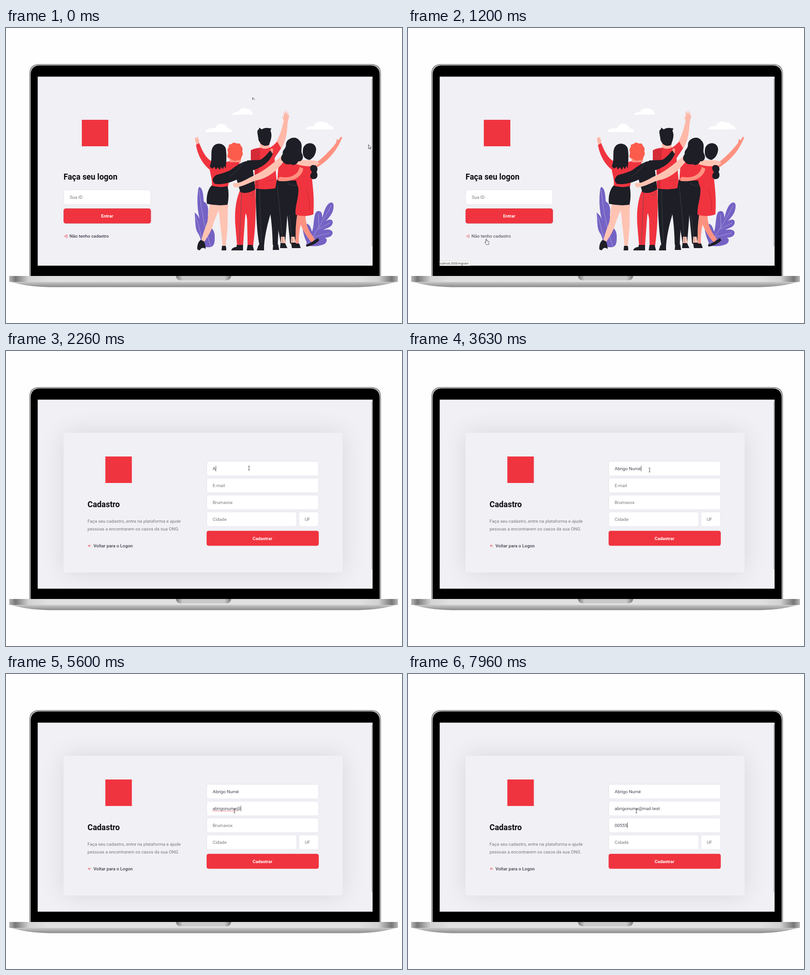
Animation, 867 px wide and 646 px high, one loop 8 s. Source, as an HTML page:

```html
<!DOCTYPE html>
<html lang="pt">
<head>
<meta charset="utf-8">
<title>Cadastro</title>
<style>
  html, body { margin: 0; width: 100%; height: 100%; overflow: hidden; background: #fefefe; }
  svg { display: block; width: 100vw; height: 100vh; }
  text { font: 400 9.8px Roboto, sans-serif; white-space: pre; fill: #454550; }
  .title { font-weight: 700; font-size: 17.43px; fill: #0c0c10; }
  .link { font-weight: 500; fill: #41414d; }
  .hint { fill: #787880; }
  .label { font-weight: 700; fill: #fff; text-anchor: middle; }
  .status { font: 6.3px "Open Sans", sans-serif; fill: #222; text-anchor: end; }
  .field { fill: #fff; stroke: #dcdce6; stroke-width: .7; }
  .red { fill: #f0343f; }
  .deep { fill: #d42b37; }
  .black { fill: #1d1e26; }
  .pale { fill: #ffc3b2; }
  .pink { fill: #ffb8a8; }
  .coral { fill: #ff9180; }
  .purple { fill: #7562c4; }
  .white { fill: #fff; }
  .line { fill: none; stroke-linecap: round; stroke-linejoin: round; }
  .icon { stroke: #f0343f; stroke-width: 2.4; }
  .vein { stroke: #b8afe4; stroke-width: .8; }
  .seam { stroke: #4b4c55; stroke-width: .7; }
  .fold { stroke: #a92330; stroke-width: .7; }
  .cursor { fill: #fff; stroke: #222; stroke-width: .8; stroke-linejoin: round; }
</style>
</head>
<body>
<svg viewBox="0 0 867 646" preserveAspectRatio="none">
  <defs>
    <clipPath id="screen"><rect x="69.400" y="106.600" width="733.200" height="414"/></clipPath>
    <filter id="blur" x="-30%" y="-50%" width="160%" height="200%"><feGaussianBlur stdDeviation="27"/></filter>
    <linearGradient id="deck" x2="1">
      <stop stop-color="#b8b8b8"/><stop offset=".016" stop-color="#777"/><stop offset=".05" stop-color="#d2d2d2"/>
      <stop offset=".1" stop-color="#e0e0e0"/><stop offset=".9" stop-color="#e0e0e0"/><stop offset=".95" stop-color="#d2d2d2"/>
      <stop offset=".984" stop-color="#777"/><stop offset="1" stop-color="#b8b8b8"/>
    </linearGradient>
    <linearGradient id="under" x2="0" y2="1"><stop stop-color="#cfcfcf"/><stop offset="1" stop-color="#8a8a8a"/></linearGradient>
    <linearGradient id="notch" x2="1">
      <stop stop-color="#777"/><stop offset=".12" stop-color="#c9c9c9"/>
      <stop offset=".88" stop-color="#c9c9c9"/><stop offset="1" stop-color="#777"/>
    </linearGradient>
  </defs>

  <!-- laptop -->
  <rect width="867" height="646" fill="#fefefe"/>
  <path fill="#7c7c7c" d="M51 543V101Q51 79 73 79H799Q821 79 821 101V543Z"/>
  <path fill="#bdbdbd" d="M52.200 543V102Q52.200 80.200 74 80.200H798Q819.800 80.200 819.800 102V543Z"/>
  <path d="M54 543V103Q54 82 75 82H797Q818 82 818 103V543Z"/>
  <path fill="url(#under)" d="M7 555H858C835 562 805 567 770 567.500H95C60 567 30 562 7 555Z"/>
  <rect x="7" y="543" width="851" height="13" fill="url(#deck)"/>
  <path fill="url(#notch)" d="M372 543H493Q492 552.500 482 552.500H383Q373 552.500 372 543Z"/>

  <g clip-path="url(#screen)">
    <rect x="69" y="106" width="734" height="415" fill="#f0f0f5"/>

    <g id="login">
      <rect class="red" x="166" y="201" width="58" height="58"/>
      <text class="title" x="126" y="332">Faça seu logon</text>
      <rect class="field" x="126.400" y="354.400" width="190.600" height="32.200" rx="4.400"/>
      <text class="hint" x="139.500" y="373.700">Sua ID</text>
      <g id="enter">
        <rect class="red" x="126.300" y="395.600" width="190.700" height="32.200" rx="4.400" stroke="#d02e3a" stroke-width=".7"/>
        <text class="label" x="221.600" y="415.200">Entrar</text>
      </g>
      <g id="signup">
        <path class="line icon" transform="translate(126.300 451.600) scale(.363)" d="M15 3h4a2 2 0 0 1 2 2v14a2 2 0 0 1-2 2h-4M10 17l5-5-5-5M15 12H3"/>
        <text class="link" x="139" y="459.200">Não tenho cadastro</text>
      </g>

      <!-- clouds -->
      <g class="white">
        <path d="M494 190C498 185 503 183 508 184C511 176 522 174 529 177C535 178 538 182 538 185Q541 186 541 190Z"/>
        <path d="M436 228C437 223 443 219 449 220C453 219 456 219 458 219C462 208 476 207 481 214C484 216 485 218 486 220C492 220 496 223 496 228Z"/>
        <path d="M656 222C659 216 666 214 674 215C677 205 688 201 697 207C701 205 707 209 708 213C714 213 717 217 717 222Z"/>
      </g>

      <!-- plants -->
      <g class="purple">
        <path d="M423 348C431 350 432 366 433 380C442 384 444 396 442 410C446 424 446 432 443 436C452 436 458 446 457 460C457 472 455 478 447 480H432C430 466 430 440 426 425C418 400 418 372 421 352Z"/>
        <path d="M413 404C424 412 428 426 429 440C434 452 434 464 432 480L428 478C428 464 424 456 421 450C413 440 415 420 413 404Z"/>
        <path d="M656 476C662 470 655 466 652 452C649 440 648 431 655 429C664 427 667 436 670 446C676 432 672 402 683 401C692 400 692 408 693 416C696 400 703 382 713 382C720 384 717 398 714 405C710 412 705 418 700 423C710 416 717 420 715 428C713 436 703 438 694 442C707 440 716 442 715 450C713 458 704 459 698 459C706 463 702 473 692 475C680 479 668 478 656 476Z"/>
      </g>
      <path class="line vein" d="M423 356Q430 425 448 478M416 414Q425 440 431 476M660 474Q686 438 712 389M672 457L657 437M685 437L684 408M682 441L709 427M671 458L708 449"/>

      <!-- woman with a raised left arm -->
      <path class="pale" d="M446 385L470 388C464 404 456 420 452 436C446 450 440 460 434 468L428 464C431 450 437 436 441 424ZM464 387H487C484 402 486 420 485 436C484 452 482 466 481 478H474C473 456 469 436 468 418Z"/>
      <path class="black" d="M426 464C421 468 418 476 419 485L424 487C428 481 432 480 437 484C437 476 435 470 433 467ZM473 477H481Q483 482 482 487H472Z"/>
      <path class="pink" d="M417 257L414 246C414 242 414 239 415 239L417 242V237L419 241L421 238V244C424 245 423 248 422 255Z"/>
      <path class="red" d="M416 256L423 252C430 270 438 286 452 293L476 295L512 286L510 303L492 316L486 348H450C453 336 448 323 446 310C430 298 419 276 416 256Z"/>
      <path class="black" d="M450 345C441 354 438 372 440 385Q464 390 485 387C488 372 488 358 485 346Q468 351 450 345Z"/>
      <path class="black" d="M450 270C452 250 474 248 481 263C484 280 482 296 481 308L478 302L475 309L471 304L468 311L464 305L459 310L457 304L451 308L446 303C451 293 449 282 450 270Z"/>

      <!-- friend with curly hair -->
      <path class="red" d="M512 356C504 375 500 400 502 430L506 477H519L523 420Q524 406 525 406Q527 410 528 420L529 477H541C546 440 548 400 546 350Z"/>
      <path class="black" d="M505 475H519V487H493Q494 481 505 479ZM529 475H540L543 487H527Z"/>
      <path class="coral" d="M488 276H514V294H490Z"/>
      <path fill="#fb5c4c" d="M487 285C482 280 487 276 486 271C483 265 487 263 488 260C486 254 493 255 495 253C500 248 504 254 507 253C514 251 513 258 516 260C520 265 516 269 518 273C520 279 514 282 515 287C510 291 506 288 502 291C496 291 494 286 487 285Z"/>
      <path class="black" d="M490 312C505 302 515 291 538 290L546 353C533 362 520 363 513 359L505 332C488 340 470 344 457 341C450 334 452 328 460 322C472 319 480 316 490 312Z"/>
      <path class="line seam" d="M516 361L511 471M531 362Q541 374 541 360"/>

      <!-- man with a raised right arm -->
      <path class="black" d="M547 349H592C589 390 570 420 565 477H555C549 445 548 410 547 380ZM569 350H597C601 390 597 425 595 475H584C583 430 579 400 569 350Z"/>
      <path class="black" d="M553 475H565V487H549ZM585 474H596L598 486H584Z"/>
      <path class="pink" d="M588 255C599 240 604 220 608 203L604 193L608 196V181L611 189L613 179L615 189L618 182L617 192L620 189C620 199 616 205 616 215C615 235 611 251 601 267ZM556 249H577V267H556Z"/>
      <path class="red" d="M536 268C541 264 550 263 557 262Q567 267 577 262C583 260 588 254 594 249L602 263C596 275 590 280 588 286L594 350Q570 356 545 351L544 309L557 291L536 292Z"/>
      <path class="deep" d="M536 268Q548 264 556 263V291H536ZM545 309L553 304V350H546Z"/>
      <path class="black" d="M553 246C552 236 549 228 551 224L554 221V218L560 222C567 217 575 219 581 220L579 225C584 236 579 247 576 256Q567 261 558 254Z"/>
      <path class="black" d="M528 290L556 289C566 284 573 274 579 268L585 274C577 293 564 303 543 311L528 312Z"/>
      <path class="coral" d="M578 267Q582 260 585 266L584 276Z"/>
      <path class="line seam" d="M519 294Q506 316 490 324"/>

      <!-- woman with long hair -->
      <path class="black" d="M593 332H638C648 365 639 410 633 472H622L616 410L611 474H602C595 430 584 390 588 360Z"/>
      <path class="pale" d="M602 457H610L612 474H602ZM624 457H632L634 474H624Z"/>
      <path class="black" d="M601 471H611L616 482H600ZM624 470H635L645 482H626Z"/>
      <path class="red" d="M600 289Q620 300 642 290L636 334H594C596 320 594 308 600 289Z"/>
      <path class="pale" d="M604 280C588 292 572 309 545 322C525 331 512 342 499 339C494 343 499 350 505 349C522 346 537 336 551 333C576 328 594 310 607 294Z"/>

      <!-- woman in a dress -->
      <path class="coral" d="M637 405H656C654 425 662 445 676 462L670 470C657 457 644 435 637 405ZM638 405L651 408Q640 440 641 474H635Q632 440 638 405Z"/>
      <path class="black" d="M671 468L683 460L686 465Q675 476 658 479L657 475ZM633 472H642L645 481H632Z"/>
      <path class="red" d="M640 300Q660 294 671 303C666 330 677 355 673 408Q655 415 634 409C632 390 642 370 640 350C632 330 633 318 640 300Z"/>
      <path class="coral" d="M672 300C692 287 711 267 723 251L724 243L728 246L733 238L736 240L732 249C721 273 699 297 674 309Z"/>
      <path class="coral" d="M643 304C640 322 622 330 600 326Q593 329 597 335C622 338 647 330 651 308Z"/>
      <path class="pale" d="M636 287C648 291 665 288 680 291Q690 296 681 300C664 306 645 301 632 297Z"/>
      <path class="black" d="M650 268C650 249 678 246 679 266C678 278 672 286 664 289Q648 286 650 268ZM671 300C682 299 684 309 680 315C684 322 682 332 672 331C663 329 666 319 670 316C664 308 665 302 671 300Z"/>
      <path class="black" d="M613 256C612 242 634 234 642 246C652 255 644 267 648 275C654 286 646 293 640 292C636 300 629 302 623 298C613 300 608 296 606 292C600 289 602 280 606 276C604 267 613 265 613 256Z"/>
      <path class="line seam" d="M594 345L606 470M617 340Q632 350 636 342M620 410L627 468M555 356L559 470"/>
      <path class="line fold" d="M657 352Q667 378 664 399M572 334Q584 336 589 329"/>
    </g>

    <g id="register">
      <rect x="126" y="179" width="611" height="306" rx="4.400" opacity=".1" filter="url(#blur)"/>
      <rect x="126" y="179" width="611" height="306" rx="4.400" fill="#f0f0f5"/>
      <rect class="red" x="217.500" y="231" width="58" height="58"/>
      <text class="title" x="178.500" y="342">Cadastro</text>
      <text class="hint" x="178.500" y="375.700">Faça seu cadastro, entre na plataforma e ajude</text>
      <text class="hint" x="178.500" y="393.200">pessoas a encontrarem os casos da sua ONG.</text>
      <path class="line icon" transform="translate(178.600 422.100) scale(.363)" d="M19 12H5M12 19l-7-7 7-7"/>
      <text class="link" x="191.500" y="429.800">Voltar para o Logon</text>
      <g class="field">
        <rect x="439.500" y="241.400" width="245" height="32.200" rx="4.400"/>
        <rect x="439.500" y="278.400" width="245" height="32.200" rx="4.400"/>
        <rect x="439.500" y="315.400" width="245" height="32.200" rx="4.400"/>
        <rect x="439.500" y="352.400" width="197" height="32.200" rx="4.400"/>
        <rect x="641.200" y="352.400" width="43.300" height="32.200" rx="4.400"/>
      </g>
      <text class="entry" x="452.500" y="261"></text>
      <text class="entry" x="452.500" y="298"></text>
      <text class="entry" x="452.500" y="335"></text>
      <text class="hint" x="452.500" y="372">Cidade</text>
      <text class="hint" x="654" y="372">UF</text>
      <path id="squiggle" class="line" stroke="#e5484d" stroke-width=".8" stroke-dasharray="1 1"/>
      <rect id="caret" width=".8" height="12" fill="#222"/>
      <rect class="red" x="439.200" y="393.800" width="245.600" height="32.700" rx="4.400"/>
      <text class="label" x="561.600" y="413.700">Cadastrar</text>
    </g>

    <rect x="800" y="111" width="2" height="367" fill="#c2c2c7"/>
    <g id="status">
      <rect x="60" y="510.500" width="76" height="12" rx="1.500" fill="#fff" stroke="#c8c8cc" stroke-width=".7"/>
      <text class="status" x="133" y="518">localhost:3000/register</text>
    </g>
    <path id="trace" class="line" stroke="#222" stroke-width=".9" d="M540 157V152.500L544.500 157"/>
    <g id="pointer">
      <path class="cursor" data-kind="arrow" d="M.5 .5V9.500L2.600 7.600L4 10.500L5.300 9.900L4 7.200H6.500Z"/>
      <path class="cursor" data-kind="hand" d="M-.9 8V1Q0 -.4 .9 1V4.500L5 5.500Q6.200 6 6 8L5 12.500H0L-3.200 8.200Q-3.200 6.500 -1.700 7.300Z"/>
      <path class="cursor" data-kind="beam" d="M-1.800 -4.500Q0 -4.500 0 -3.500Q0 -4.500 1.800 -4.500M0 -3.500V3.500M-1.800 4.500Q0 4.500 0 3.500Q0 4.500 1.800 4.500"/>
    </g>
  </g>
</svg>
<script>
const LOOP = 8000, REGISTER_AT = 1600;
const byId = id => document.getElementById(id);
const show = (el, on) => el.style.display = on ? '' : 'none';
const entries = [...document.querySelectorAll('.entry')];
const pointers = [...document.querySelectorAll('[data-kind]')];

// time, x, y
const path = [
  [0, 793, 255], [30, 793, 255], [160, 505, 226], [330, 505, 226], [460, 262, 296],
  [660, 262, 296], [1000, 185, 455], [1200, 171.500, 461.500], [1600, 171.500, 461.500],
  [1960, 532, 256.500], [3560, 532, 256.500], [3930, 500, 300], [LOOP, 500, 300]
];

const fields = [
  { hint: 'Nome da ONG', value: 'Abrigo Numé', focus: 1960, blink: 530,
    keys: [2160, 2330, 2430, 2530, 2630, 2760, 2860, 3060, 3300, 3400, 3500] },
  { hint: 'E-mail', value: 'abrigonume@mail.test', focus: 3930, blink: 530,
    keys: [4160, 4230, 4330, 4500, 4560, 4730, 4800, 4960, 5100, 5260,
           5600, 6100, 6160, 6260, 6330, 6400, 6460, 6530, 6600, 6640] },
  { hint: 'Brumavox', value: '00555', focus: 6700, blink: 170,
    keys: [7400, 7560, 7700, 7860, 7930] }
];

function pointerAt(t) {
  const i = path.findIndex(p => p[0] > t);
  const [t0, x0, y0] = path[i - 1], [t1, x1, y1] = path[i];
  const u = (t - t0) / (t1 - t0), k = u * u * (3 - 2 * u);
  return [x0 + (x1 - x0) * k, y0 + (y1 - y0) * k];
}

function hovered(t, x, y) {
  const inside = (l, top, r, b) => x >= l && x <= r && y >= top && y <= b;
  if (t < REGISTER_AT) {
    if (inside(126, 354, 317, 387)) return 'input';
    if (inside(126, 395, 317, 428)) return 'enter';
    if (inside(126, 450, 226, 465)) return 'signup';
  } else {
    if (t < REGISTER_AT + 40) return 'signup';
    if (inside(439, 241, 685, 385)) return 'input';
  }
  return '';
}

function drawForm(t) {
  const active = fields.findLastIndex(f => t >= f.focus);
  let caretX = 0, caretOn = false;
  fields.forEach((f, i) => {
    const el = entries[i], count = f.keys.filter(k => k <= t).length;
    el.textContent = count ? f.value.slice(0, count) : f.hint;
    el.classList.toggle('hint', !count);
    if (i !== active) return;
    caretX = 452.700 + (count ? el.getComputedTextLength() : 0);
    const idle = t - (count ? f.keys[count - 1] : f.focus);
    caretOn = Math.floor(idle / f.blink) % 2 === 0;
  });
  const caret = byId('caret');
  caret.setAttribute('x', caretX);
  caret.setAttribute('y', 251.500 + 37 * Math.max(active, 0));
  show(caret, caretOn);

  const flagged = t >= 5430 && t < 6700;
  show(byId('squiggle'), flagged);
  if (flagged) byId('squiggle').setAttribute('d', `M452.500 300H${452.500 + entries[1].getSubStringLength(0, 10)}`);
}

function draw() {
  const t = performance.now() % LOOP, registering = t >= REGISTER_AT;
  show(byId('login'), !registering);
  show(byId('register'), registering);
  if (registering) drawForm(t);

  const [x, y] = pointerAt(t), target = hovered(t, x, y);
  const kind = target === 'input' ? 'beam' : target ? 'hand' : 'arrow';
  byId('pointer').setAttribute('transform', `translate(${x} ${y})`);
  pointers.forEach(p => show(p, p.dataset.kind === kind));
  byId('enter').style.filter = target === 'enter' ? 'brightness(.9)' : '';
  byId('signup').style.opacity = target === 'signup' ? .8 : 1;
  show(byId('status'), target === 'signup' || (t > 1600 && t < 1760));
  show(byId('trace'), t < 30);
  requestAnimationFrame(draw);
}
draw();
</script>
</body>
</html>
```
